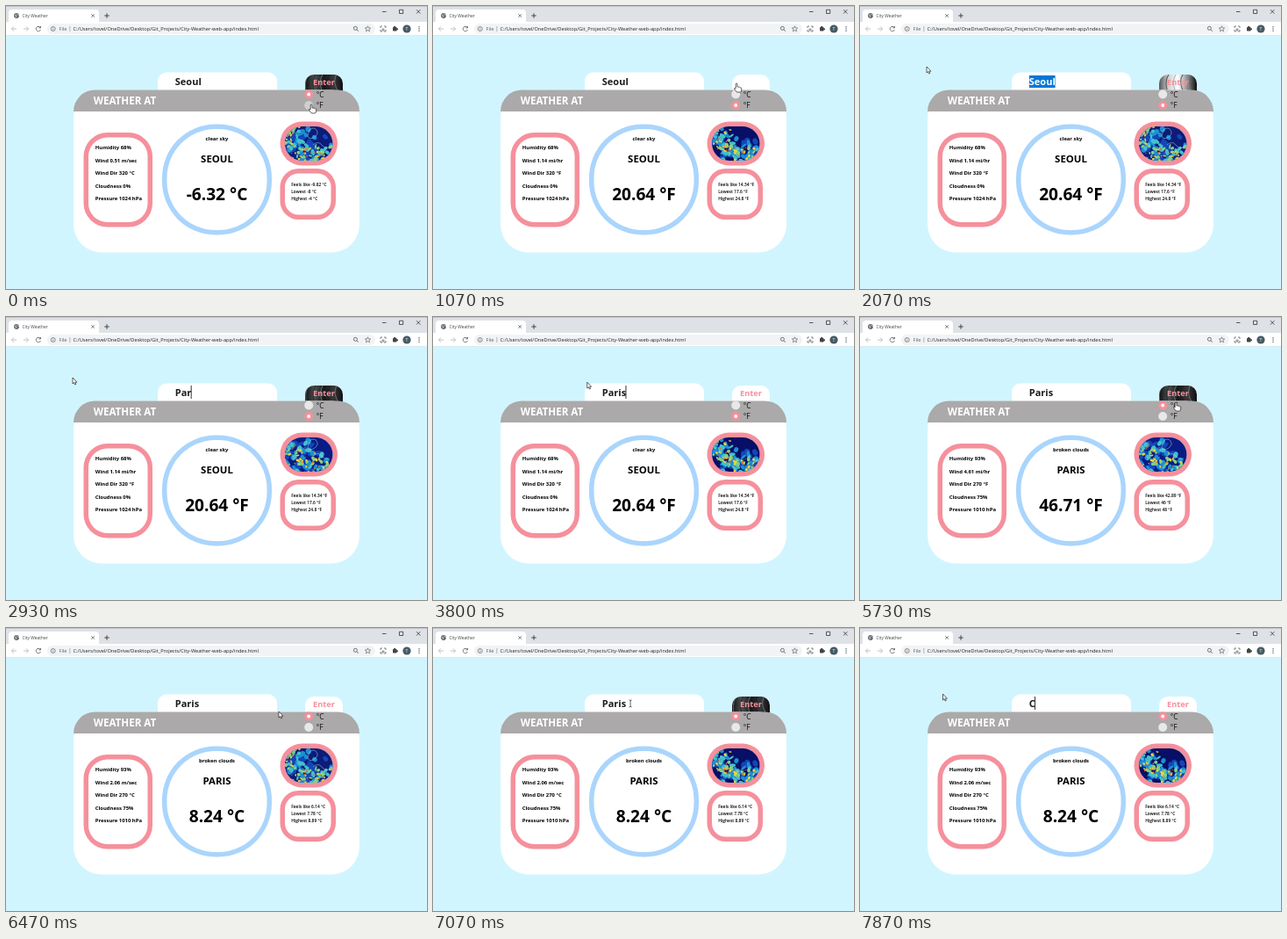
An HTML page with a canvas for the animation above (8000 ms loop, 480 by 322 pixels).

```html
<!DOCTYPE html>
<html lang="en">
<head>
<meta charset="utf-8">
<title>City Weather</title>
<style>
html, body { margin: 0; width: 100%; height: 100%; overflow: hidden; background: #d1f5fe; }
canvas { display: block; width: 480px; height: 322px; }
</style>
</head>
<body>
<canvas id="stage" width="480" height="322"></canvas>
<script>
const ctx = document.getElementById('stage').getContext('2d');
const LOOP = 8000;
const PINK = '#f5909c';
const SANS = '"Open Sans", "Noto Sans", sans-serif';

// Pointer stops: time, x, y
const pointerPath = [
  [0, 348, 112], [250, 348, 112], [720, 346, 88], [1100, 346, 88],
  [1380, 230, 86], [1450, 226, 86], [1760, 80, 69], [1900, 76, 69],
  [3560, 76, 69], [4200, 389, 85], [4330, 386, 87], [4600, 362, 85],
  [5150, 362, 85], [5480, 360, 97], [5800, 360, 97], [6020, 358, 88],
  [6200, 358, 88], [6470, 311, 95], [6900, 230, 86], [7050, 226, 86],
  [7480, 94.5, 75], [LOOP, 94.5, 75]
];

const reports = [
  { from: 0, sky: 'clear sky', city: 'SEOUL', temp: '-6.32 °C',
    details: ['Humidity 68%', 'Wind 0.51 m/sec', 'Wind Dir 320 °C', 'Cloudness 0%', 'Pressure 1024 hPa'],
    range: ['Feels like -9.82 °C', 'Lowest -8 °C', 'Highest -4 °C'] },
  { from: 1000, sky: 'clear sky', city: 'SEOUL', temp: '20.64 °F',
    details: ['Humidity 68%', 'Wind 1.14 mi/hr', 'Wind Dir 320 °F', 'Cloudness 0%', 'Pressure 1024 hPa'],
    range: ['Feels like 14.34 °F', 'Lowest 17.6 °F', 'Highest 24.8 °F'] },
  { from: 4870, sky: 'broken clouds', city: 'PARIS', temp: '46.71 °F',
    details: ['Humidity 93%', 'Wind 4.61 mi/hr', 'Wind Dir 270 °F', 'Cloudness 75%', 'Pressure 1010 hPa'],
    range: ['Feels like 42.89 °F', 'Lowest 46 °F', 'Highest 48 °F'] },
  { from: 6200, sky: 'broken clouds', city: 'PARIS', temp: '8.24 °C',
    details: ['Humidity 93%', 'Wind 2.06 m/sec', 'Wind Dir 270 °C', 'Cloudness 75%', 'Pressure 1010 hPa'],
    range: ['Feels like 6.14 °C', 'Lowest 7.78 °C', 'Highest 8.89 °C'] }
];

const radarColours = ['#1446b8', '#1c8ed4', '#44c0cc', '#88d080', '#ecd43c', '#e06c24'];
const radarScenes = [
  { seed: 7, base: '#0c1c78', spread: 30, contour: true },
  { seed: 21, base: '#0a1c84', spread: 34, contour: true },
  { seed: 40, base: '#070f66', spread: 24, contour: false }
];

const between = (t, a, b) => t >= a && t < b;
const inside = (p, x, y, w, h) => between(p.x, x, x + w) && between(p.y, y, y + h);

function random(seed) {
  return () => (seed = (seed * 16807) % 2147483647) / 2147483647;
}

function rect(x, y, w, h, fill) {
  ctx.fillStyle = fill;
  ctx.fillRect(x, y, w, h);
}

function round(x, y, w, h, r, fill) {
  ctx.beginPath();
  ctx.roundRect(x, y, w, h, r);
  ctx.fillStyle = fill;
  ctx.fill();
}

function dot(x, y, r, fill) {
  ctx.beginPath();
  ctx.arc(x, y, r, 0, 7);
  ctx.fillStyle = fill;
  ctx.fill();
}

function stroke(d, colour, width = 0.9) {
  ctx.strokeStyle = colour;
  ctx.lineWidth = width;
  ctx.stroke(new Path2D(d));
}

function text(s, x, y, size, { weight = 700, fill = '#000', align = 'left' } = {}) {
  ctx.font = `${weight} ${size}px ${SANS}`;
  ctx.textAlign = align;
  ctx.fillStyle = fill;
  ctx.fillText(s, x, y);
}

function frame(x, y, w, h, r, line, colour) {
  round(x, y, w, h, r, colour);
  round(x + line, y + line, w - 2 * line, h - 2 * line, r - line, '#fff');
}

function pointerAt(t) {
  const i = pointerPath.findIndex(k => k[0] > t);
  const [t0, x0, y0] = pointerPath[i - 1], [t1, x1, y1] = pointerPath[i];
  const u = (t - t0) / (t1 - t0), e = u * u * (3 - 2 * u);
  return { x: x0 + (x1 - x0) * e, y: y0 + (y1 - y0) * e };
}

function fieldText(t) {
  if (t < 2600) return 'Seoul';
  if (t < 7840) return 'Paris'.slice(0, 1 + Math.floor((t - 2600) / 150));
  return 'C';
}

function drawBrowser() {
  rect(0, 0, 480, 18, '#dee1e6');
  rect(0, 0, 480, 1, '#c0c3c8');
  round(3, 4, 103, 15, [4, 4, 0, 0], '#fff');
  rect(0, 18, 480, 15, '#fff');
  rect(0, 33, 480, 0.6, '#dfe4e8');
  dot(12, 11, 2.9, '#5f6368');
  stroke('M10 10l2 1-1 2M12 8.6l1.6 1.6 1 .2', '#fff', 0.7);
  text('City Weather', 18.5, 13, 4.9, { weight: 400, fill: '#3c4043' });
  stroke('M97.3 9.2l3.6 3.6m0-3.6l-3.6 3.6', '#5f6368', 0.8);
  stroke('M112.3 11h5.4M115 8.3v5.4', '#444', 1);
  stroke('M429 6.5h4.5M448.5 4.3h4.2v4.2h-4.2zM468 4.2l4.4 4.4m0-4.4l-4.4 4.4', '#333', 0.8);

  stroke('M12 26H6.5m2.5-2.6L6.4 26 9 28.6M20 26h5.5m-2.5-2.6l2.6 2.6-2.6 2.6', '#b8babd');
  stroke('M39 24.3a2.7 2.7 0 1 0 .4 2.8M39.5 22.9v2h-2', '#5f6368');
  round(47, 20, 374, 12, 6, '#f1f3f4');
  stroke('M51.2 26a2.5 2.5 0 1 0 5 0a2.5 2.5 0 1 0-5 0M53.7 25.6v1.8M53.7 24.4v.6', '#5f6368', 0.7);
  text('File', 60.5, 28, 5.6, { weight: 400, fill: '#5f6368' });
  rect(72.5, 23, 0.7, 6, '#9aa0a6');
  text('C:/Users/tovel/OneDrive/Desktop/Git_Projects/City-Weather-web-app/index.html',
    76.5, 28, 5.65, { weight: 400, fill: '#202124' });
  stroke('M396.4 25.3a2 2 0 1 0 4 0a2 2 0 1 0-4 0M399.9 26.8l2 2', '#5f6368');
  stroke('M412.5 22.8l.9 2.1 2.3.2-1.8 1.5.6 2.2-2-1.2-2 1.2.6-2.2-1.8-1.5 2.3-.2z', '#5f6368', 0.7);
  stroke('M427 25v-2h2m2 0h2v2m0 2v2h-2m-2 0h-2v-2', '#5f6368', 0.8);
  round(428.5, 25.5, 3, 3, 0.5, '#9aa0a6');
  round(441, 24, 4.6, 4.6, 0.8, '#444');
  dot(443.2, 23.8, 1.1, '#444');
  dot(446, 26.3, 1.1, '#444');
  dot(457, 26, 4.6, '#455a64');
  text('T', 457, 28, 5.2, { weight: 400, fill: '#fff', align: 'center' });
  for (const y of [23.7, 26, 28.3]) dot(471, y, 0.75, '#5f6368');
}

function drawField(t, pointer) {
  round(173, 75.5, 136, 24, [10, 10, 0, 0], '#fff');
  const value = fieldText(t), x = 192.8, size = 11;
  text(value, x, 90, size, { fill: '#1c1c1c' });
  const end = x + ctx.measureText(value).width;

  if (between(t, 1450, 2600) || between(t, 7050, 7840)) {
    const left = Math.max(x, Math.min(end, pointer.x));
    ctx.save();
    ctx.beginPath();
    ctx.rect(left, 79, end - left, 14);
    ctx.clip();
    rect(left, 79, end - left, 14, '#0078d7');
    text(value, x, 90, size, { fill: '#fff' });
    ctx.restore();
  }
  const typing = between(t, 2600, 3350) || t >= 7840;
  const blinking = between(t, 3350, 4750) && (t - 3100) % 1000 >= 500;
  if (typing || blinking) rect(end - 0.6, 78, 0.8, 15, '#000');
}

function drawButton(t, pointer) {
  const phase = t % 2870;
  const bright = between(phase, 650, 1250) || between(phase, 2125, 2520);
  const flash = between(phase, 1600, 2125);
  ctx.save();
  round(341, 78, 43, 22, [10, 10, 0, 0], '#fff');
  ctx.clip();
  if (!bright) {
    const shade = ctx.createLinearGradient(341, 0, 384, 0);
    const tones = flash ? ['#555', '#d0d0d0', '#fff', '#8c8c8c', '#0c0c0c']
                        : ['#101012', '#4c5052', '#18181a', '#38383c', '#101012'];
    tones.forEach((c, i) => shade.addColorStop(i / 4, c));
    rect(341, 78, 43, 22, shade);
    const sway = Math.sin(phase / 180);
    ctx.globalAlpha = 0.6;
    for (let i = 0; i < 5; i++) {
      const x = 345 + i * 8 + sway;
      stroke(`M${x} 78q-5 7 ${i - 3} 18`, i % 2 ? '#18181b' : '#8c9094', 1.1);
    }
    ctx.globalAlpha = 1;
  }
  ctx.restore();
  const hover = inside(pointer, 341, 78, 43, 17);
  text('Enter', 362.5, 90, 9.3, { fill: hover ? '#fff' : PINK, align: 'center' });
}

function drawRadio(label, y, selected, hover) {
  dot(345.2, y, 5, selected ? PINK : hover ? '#cfcfcf' : '#e8e8e8');
  if (selected) dot(345.2, y, 1.9, '#fff');
  text(label, 353.7, y + 3.4, 8.4, { weight: 400, fill: '#111' });
}

// Storm bands gather along a curve down the left side and across the bottom.
function stormPoint(u) {
  const a = (1 - u) ** 2, b = 2 * u * (1 - u), c = u * u;
  return [a * 320 + b * 328 + c * 372, a * 137 + b * 172 + c * 171];
}

function drawRadar(t) {
  const phase = t >= 7730 ? 270 : t % 400;
  const scene = radarScenes[Math.min(2, Math.floor(phase / 100))];
  const rnd = random(scene.seed * 9973);
  const drift = Math.floor(phase / 66) * 0.3;
  ctx.save();
  round(318, 137, 54.5, 39, 20, scene.base);
  ctx.clip();
  radarColours.forEach((colour, level) => {
    const spread = scene.spread * (1 - level * 0.1);
    const size = 5.5 - level * 0.85;
    for (let i = 0; i < 38 - level * 3; i++) {
      const [x, y] = stormPoint(rnd());
      const dx = (rnd() + rnd() - 1) * spread + drift;
      const dy = (rnd() + rnd() - 1) * spread * 0.7;
      ctx.beginPath();
      ctx.ellipse(x + dx, y + dy, size * (0.4 + rnd() * 0.6), size * (0.3 + rnd() * 0.4), rnd() * 3, 0, 7);
      ctx.fillStyle = colour;
      ctx.fill();
    }
  });
  if (scene.contour) {
    ctx.globalAlpha = 0.7;
    stroke('M346 141q5-4 8 0t-2 8q-6 4-8-1zM350 158q6-5 10 0t9 3', '#a8dcec', 0.7);
  }
  ctx.restore();
}

function drawCard(t, pointer) {
  const report = reports.filter(r => r.from <= t).pop();
  round(77, 95.5, 326, 185, 32, '#fff');
  round(77, 95.5, 326, 24.5, [24.5, 24.5, 0, 0], '#aba9a9');
  text('WEATHER AT', 99.7, 112, 11.6, { fill: '#fff' });

  const fahrenheit = between(t, 200, 5600);
  drawRadio('°C', 100.5, !fahrenheit, inside(pointer, 340, 95, 10, 11));
  drawRadio('°F', 113, fahrenheit, inside(pointer, 340, 108, 10, 11));

  frame(88.5, 144, 78.5, 107.5, 27, 5.5, PINK);
  report.details.forEach((s, i) => text(s, 101.8, 163 + i * 14.55, 5.9));

  frame(178, 134.5, 125, 126, 61, 5.5, '#aad5fc');
  text(report.sky, 240.5, 153, 5.85, { align: 'center' });
  text(report.city, 240.5, 178.3, 11.4, { align: 'center' });
  text(report.temp, 240.5, 220.8, 19.1, { align: 'center' });

  frame(312.5, 131.5, 65.5, 50, 25, 5.5, PINK);
  drawRadar(t);
  frame(312.5, 185, 63.5, 58, 21, 5.5, PINK);
  report.range.forEach((s, i) => text(s, 325.2, 205.2 + i * 8, 4.9, { weight: 600 }));
}

function drawPointer(t, p) {
  const overButton = inside(p, 341, 78, 43, 17);
  const overRadio = inside(p, 340, 95, 24, 24);
  const dragging = between(t, 1450, 2600) || t >= 7050;
  const overField = inside(p, 173, 76, 136, 19);
  let shape;
  if (overButton || overRadio) {
    shape = 'M-.8.5q.9-1.2 1.8 0V4q1.2-.6 1.7.3 1.2-.4 1.6.5 1.4-.3 1.4.9V8q-.4 1.3-1 2H.3L-2.6 6.2q-.3-1.4 1.8-.4z';
  } else if (overField || (dragging && p.x > 173)) {
    shape = 'M-1.5-4Q0-4 0-3V3Q0 4-1.5 4M1.5-4Q0-4 0-3M0 3Q0 4 1.5 4';
  } else {
    shape = 'M0 0V7L1.6 5.6 2.7 8 3.8 7.5 2.8 5.2H4.9z';
  }
  ctx.save();
  ctx.translate(p.x, p.y);
  if (!overField) {
    ctx.fillStyle = '#fff';
    ctx.fill(new Path2D(shape));
  }
  stroke(shape, '#222', 0.7);
  ctx.restore();
}

function draw(now) {
  const t = now % LOOP;
  const pointer = pointerAt(t);
  rect(0, 0, 480, 322, '#d1f5fe');
  drawBrowser();
  drawField(t, pointer);
  drawButton(t, pointer);
  drawCard(t, pointer);
  drawPointer(t, pointer);
  requestAnimationFrame(draw);
}
requestAnimationFrame(draw);
</script>
</body>
</html>
```
